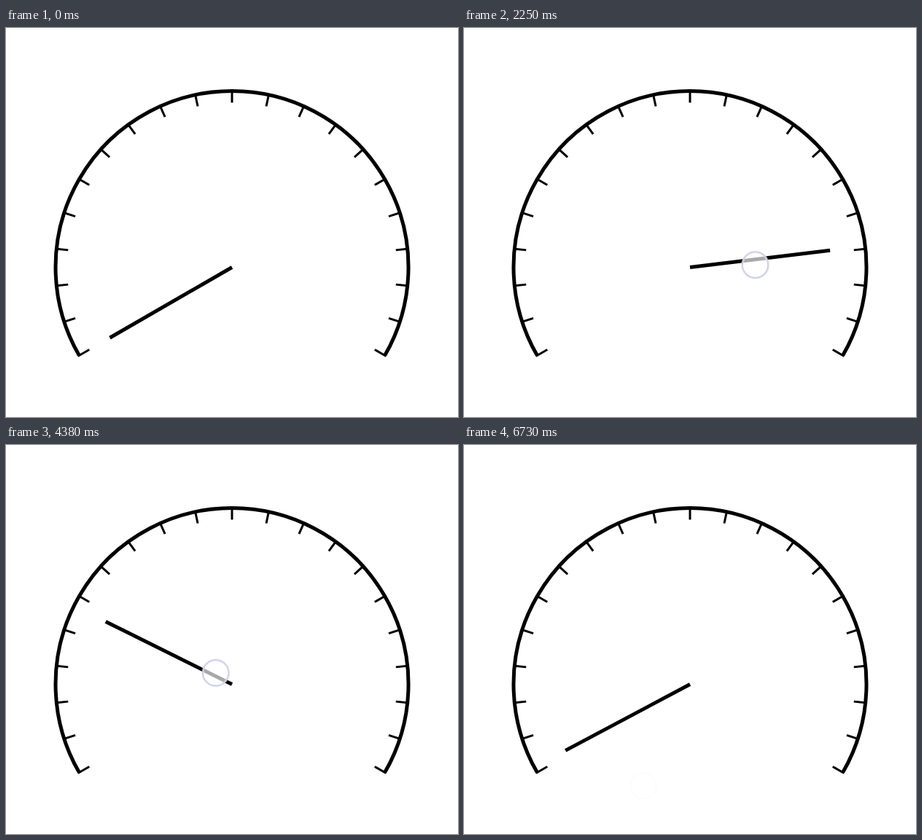
An HTML page that plays this animation: 620x534 px, repeating every 7.48 s.

```html
<!DOCTYPE html>
<html lang="en">
<head>
<meta charset="utf-8">
<title>Gauge</title>
<style>
  html, body { margin: 0; width: 100%; height: 100%; overflow: hidden; background: #fff; }
  svg { display: block; width: 620px; height: 534px; }
  #dial, #needle { fill: none; stroke: #000; }
  #touch circle { fill: #fff; fill-opacity: .66; stroke: #cfd0e8; stroke-width: 2; }
  #touch .halo { fill: none; stroke-width: 4; stroke-opacity: .3; }
</style>
</head>
<body>
<svg viewBox="0 0 620 534">
  <g transform="translate(310 328.5)">
    <g id="dial">
      <path d="M-209.6 121A242 242 0 1 1 209.6 121" stroke-width="5"/>
      <path id="ticks" stroke-width="3"/>
    </g>
    <path id="needle" d="M0 0V-193.5" stroke-width="5"/>
  </g>
  <g id="touch" opacity="0">
    <circle class="halo" r="17.7"/>
    <circle r="17.7"/>
  </g>
</svg>
<script>
const LOOP = 7480, CX = 310, CY = 328.5;
const REST = -120;              // needle before the first touch
const REACH = 118;              // furthest angle a drag can set
const LAG = 27;                 // needle trails the finger, in ms
const DOWN = 860, LIFT = 6590, PAUSE_END = 5590;

// Two drags of the finger: [time, x, y]
const sweep = [
  [DOWN, 222, 376], [1100, 213, 322], [1350, 248, 262], [1500, 282.5, 250],
  [1650, 315, 244], [1900, 375, 270], [2120, 395, 293], [2250, 399.5, 325],
  [2400, 395, 371], [2620, 382, 412], [2980, 385, 318], [3260, 342, 262],
  [3420, 300.5, 263], [3560, 260, 276], [3870, 221, 352], [4100, 222, 412],
  [4260, 262, 328], [4380, 287.5, 313], [4520, 306, 300], [4900, 378, 328],
  [5100, 373, 362.5], [5250, 366, 382]
];
const back = [
  [PAUSE_END, 366, 382], [5830, 362, 292], [6100, 262, 302],
  [6330, 227, 430], [6480, 246, 467.7]
];

const needle = document.getElementById('needle');
const touch = document.getElementById('touch');
const clamp = (v, lo, hi) => Math.min(hi, Math.max(lo, v));

// Cubic spline through the keys, at rest at both ends
function spline(keys, t, c) {
  const last = keys.length - 1;
  const time = clamp(t, keys[0][0], keys[last][0]);
  const i = clamp(keys.findIndex(k => k[0] >= time) - 1, 0, last - 1);
  const tangent = j => j === 0 || j === last ? 0 :
    (keys[j + 1][c] - keys[j - 1][c]) / (keys[j + 1][0] - keys[j - 1][0]);
  const p = keys[i], q = keys[i + 1];
  const h = q[0] - p[0], u = (time - p[0]) / h, v = 1 - u;
  return v * v * (1 + 2 * u) * p[c] + u * u * (1 + 2 * v) * q[c]
    + h * u * v * (v * tangent(i) - u * tangent(i + 1));
}

function finger(t) {
  const keys = t < PAUSE_END ? sweep : back;
  return [spline(keys, t, 1), spline(keys, t, 2)];
}

function needleAngle(t) {
  if (t < DOWN) return REST;
  const [x, y] = finger(t - LAG);
  return clamp(Math.atan2(x - CX, CY - y) * 180 / Math.PI, -REACH, REACH);
}

// Fades in on touch and leaves a faint trace after the lift
function touchOpacity(t) {
  const fadeOut = Math.max(.05, 1 - (t - LIFT) / 145);
  return clamp(Math.min((t - DOWN) / 100, fadeOut), 0, 1);
}

function drawTicks() {
  let d = '';
  for (let deg = -120; deg <= 120; deg += 12) {
    const a = deg * Math.PI / 180;
    const at = r => (r * Math.sin(a)).toFixed(2) + ' ' + (-r * Math.cos(a)).toFixed(2);
    d += `M${at(226)}L${at(244)}`;
  }
  document.getElementById('ticks').setAttribute('d', d);
}

function render(now) {
  const t = now % LOOP;
  needle.setAttribute('transform', `rotate(${needleAngle(t)})`);
  touch.setAttribute('transform', `translate(${finger(t)})`);
  touch.setAttribute('opacity', touchOpacity(t));
}

function tick() {
  render(performance.now());
  requestAnimationFrame(tick);
}

drawTicks();
tick();
</script>
</body>
</html>
```
